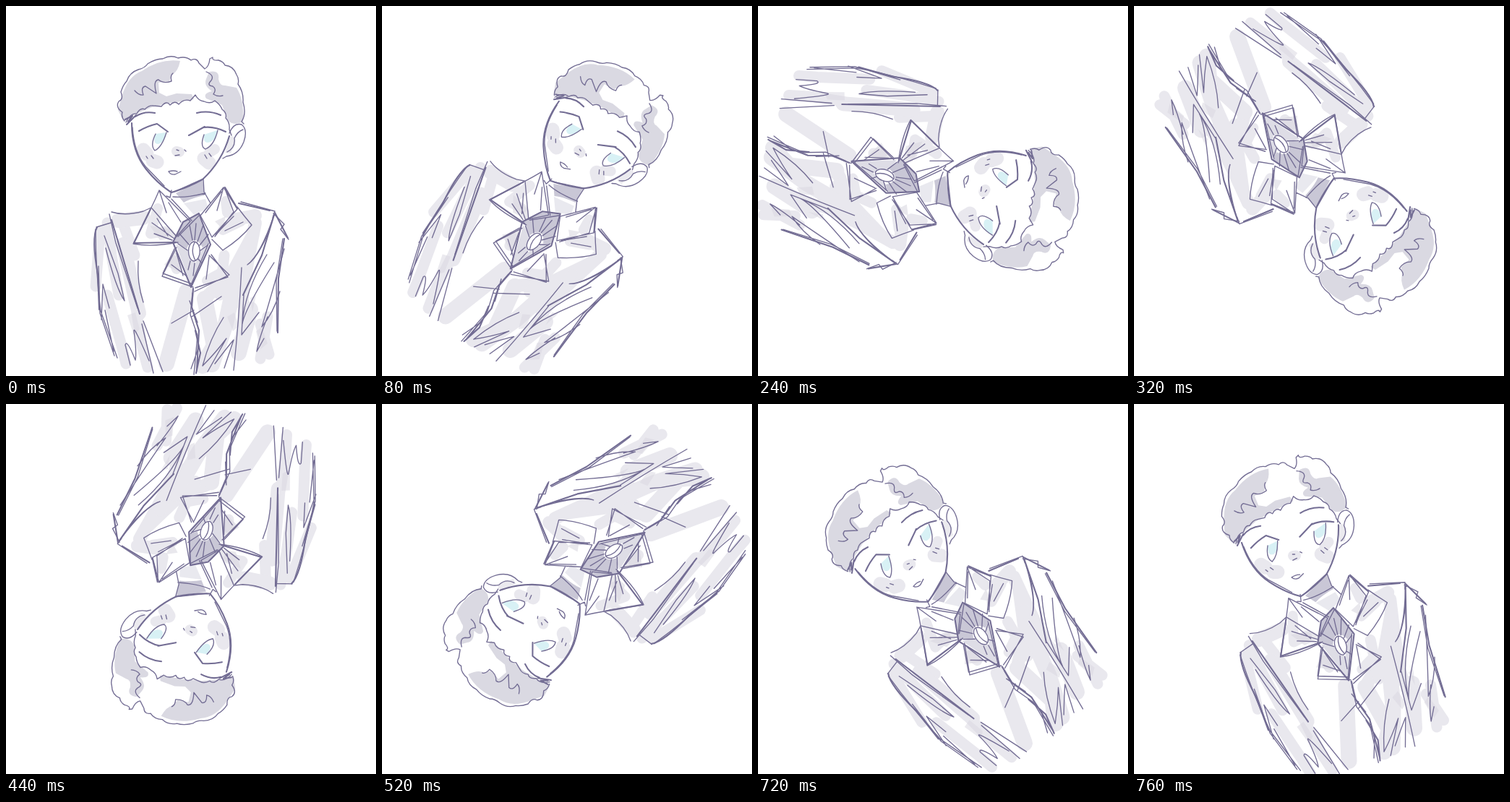
An HTML page that plays this animation: 512x512 px, repeating every 0.8 s.

```html
<!DOCTYPE html>
<html lang="en">
<head>
<meta charset="utf-8">
<title>Spinning sketch</title>
<style>
html, body { margin: 0; width: 100%; height: 100%; overflow: hidden; background: #fff; }
svg { display: block; width: 100vw; height: 100vh; }
path { fill: none; stroke-linecap: round; stroke-linejoin: round; }
.wash path { stroke: #e9e8ee; }
.tone path { fill: #dad9e2; }
.deep path { fill: #c9c7d6; }
.ink path { stroke: #736d94; stroke-width: 1.35; }
.ink .bold { stroke-width: 2.1; }
.gem { fill: #fff; }
.iris { fill: #d8f1f5; }
</style>
</head>
<body>
<svg viewBox="0 0 512 512">
<g id="figure">
  <g class="wash">
    <!-- sleeves and shoulders -->
    <path stroke-width="15" d="M130 312L124 388M140 300L146 345L156 400M160 296L178 345M140 400L160 470L166 495"/>
    <path stroke-width="20" d="M155 297L190 293M162 330L178 400L184 425"/>
    <path stroke-width="18" d="M318 295L345 290M345 300L335 350L325 410M340 320L312 372L280 400"/>
    <!-- body -->
    <path stroke-width="22" d="M250 395L236 445L222 495M275 405L288 470L272 498M318 375L304 440L285 496M338 420L322 480"/>
    <path stroke-width="15" d="M181 425L188 470L196 500M362 430L352 488M352 440L364 482M302 345L296 400M330 345L328 440"/>
    <!-- collar and bow -->
    <path stroke-width="14" d="M210 280L200 315L220 312M304 270L306 286M300 310L325 298M300 368L278 380M232 352L236 364"/>
    <!-- cheeks and nose -->
    <path stroke-width="19" d="M190 199L195 205M203 214L209 216M274 211L281 217"/>
    <path stroke-width="14" d="M236 201L240 202M281 203L289 198"/>
  </g>
  <g class="tone">
    <path d="M188 90Q214 72 241 76Q238 91 230 95L226 104L211 106L212 120L222 125L236 121L257 122L260 129L244 132L228 134L202 140L178 150L163 160L155 144L161 123Q169 97 188 90Z"/>
    <path d="M281 91Q296 88 294 101Q296 111 303 110L319 113Q330 130 328 160Q314 167 306 157L299 137L277 128Q272 121 285 118Q273 110 277 101Z"/>
    <path opacity=".55" d="M309 182Q316 176 317 187L311 204L303 203Z"/>
    <path opacity=".55" d="M168 428L179 424L185 447L177 456ZM306 430L316 424L322 443L314 450ZM346 450L354 444L362 467L352 475ZM338 404L346 400L341 424Z"/>
    <path opacity=".6" d="M199 304L230 309L238 320L213 324ZM219 358L236 337L245 371ZM289 298L304 291L300 309Z"/>
  </g>
  <g class="deep">
    <path d="M235 259L272 241L275 262Q256 266 246 272Z"/>
    <path opacity=".4" d="M246 273L276 267L280 280L260 289Z"/>
    <path d="M244 301L267 287L283 328L272 334Q260 313 250 336L232 326Z"/>
    <path opacity=".6" d="M235 330L251 336L262 356L272 334L281 331L256 387Z"/>
  </g>
  <path class="gem" d="M260 326C271 327 271 351 260 353C250 351 250 328 260 326Z"/>
  <path class="iris" d="M207 177L221 175Q219 189 211 191Q202 191 207 177ZM274 178L292 172Q293 183 283 188Q272 192 274 178Z"/>

  <g class="ink">
    <!-- hair -->
    <path d="M164 159Q159 153 161 147Q151 140 156 132Q163 129 159 119Q162 109 167 104Q171 92 183 88Q192 86 196 80Q207 73 217 73Q228 67 238 72Q249 69 256 75Q264 71 267 79L275 87Q281 84 282 73L286 71Q285 76 294 75Q301 77 303 82Q315 83 319 95Q323 101 321 108Q329 119 328 133Q333 149 326 160L329 163"/>
    <path d="M166 161Q172 148 181 149Q186 140 192 143Q198 137 204 138L215 139Q222 130 227 137Q234 130 239 136Q246 128 255 131L262 123Q266 131 274 132Q283 136 289 131Q297 137 299 143Q306 148 304 155Q310 161 309 171L312 179"/>
    <path d="M178 117Q184 124 190 123Q186 112 193 111L208 121Q203 103 211 102Q218 108 229 104Q227 96 231 93M277 91Q289 96 284 103Q277 110 286 111Q292 115 287 122Q293 126 300 124"/>
    <path class="bold" d="M167 164L180 151M165 157L175 152L169 160"/>
    <!-- face and ear -->
    <path class="bold" d="M174 162C174 190 181 210 194 226Q211 247 229 258Q250 252 272 240Q299 215 309 180"/>
    <path d="M175 168Q177 202 193 222L219 249M233 257L273 239M309 176Q315 161 326 164Q335 171 329 188Q322 206 305 208L300 211M306 202Q318 196 316 183Q320 174 328 171"/>
    <path class="bold" d="M179 153Q191 145 206 148M264 148Q281 144 297 151"/>
    <path class="bold" d="M184 173Q196 166 209 163L224 174M253 179L275 167L273 168Q288 166 304 174"/>
    <path d="M207 177Q199 193 206 200Q216 195 222 175M274 178Q268 195 276 198Q288 193 293 172"/>
    <path d="M194 208L196 211M201 207L204 211M275 206L278 211M281 204L284 208M236 199L239 200M247 199L249 201M234 207L240 206M225 229Q232 227 237 229M225 229Q228 234 234 233L242 229"/>
    <!-- neck and collar -->
    <path d="M229 255L227 265L222 263M273 239L274 257L283 273M231 264Q248 266 276 259M212 255Q207 267 201 279L236 319L255 298L212 255L222 286M229 267L257 297M225 272L242 299M301 251L269 290L285 320L320 281L301 251L292 283M303 253L315 285L289 319M276 286L298 257"/>
    <path class="bold" d="M200 281L177 328L235 327M303 251L320 280"/>
    <!-- bow -->
    <path d="M198 286L176 329Q202 334 238 327M202 300L233 322M205 315L230 324M209 294L224 318M320 278Q329 290 340 303Q325 322 300 338L285 323M315 291L290 316M303 311L328 299"/>
    <path class="bold" d="M245 299L231 327L256 389L283 330L267 287L245 299"/>
    <path d="M238 319L268 289M280 329L256 386M233 336L217 370L256 384M236 334L216 374L259 389M236 342L245 373M229 358L249 373M281 345L309 372L261 395M284 344L307 375L262 390M281 347L277 378"/>
    <path d="M260 326C271 327 271 351 260 353C250 351 250 328 260 326M261 327Q255 339 262 352M258 324L254 303M261 324L263 301M265 326L273 303M268 331L280 316M253 330L240 315M251 338L238 329M268 339L279 331M266 350L271 356M255 353L252 365M261 356L259 373"/>
    <!-- left sleeve and lapel -->
    <path class="bold" d="M146 296L185 426M126 306Q118 321 127 371L129 420"/>
    <path d="M146 285Q165 291 190 284L201 279M125 306L145 300M143 288L152 328L182 418M124 309Q124 367 131 422L154 487M128 360L130 425L150 484M136 318L155 370L164 408Q152 390 138 335M143 418L134 385L132 434M137 421L149 478M183 353Q181 383 190 410M190 436L217 506M188 440L204 508M198 491Q176 440 177 450Q181 480 179 490Q167 460 165 469L172 497"/>
    <!-- right sleeve -->
    <path class="bold" d="M322 273L365 283M372 286L390 321M385 322L377 377L376 452M371 289L354 345L328 400"/>
    <path d="M325 271L372 284L369 293M370 287L385 302L380 309L391 323M383 322L374 380L375 450M385 336Q366 405 354 444Q370 425 379 395M371 289Q352 345 334 358Q347 350 363 314M361 344Q330 395 327 440Q330 420 371 355M326 362Q322 440 315 504M329 400L326 455L350 424M362 430Q350 460 347 478L357 460"/>
    <!-- front of the coat -->
    <path class="bold" d="M259 391L257 417L267 449L264 504M262 449L269 480L263 508"/>
    <path d="M258 397L255 427L265 456L260 510M257 430L298 402L266 424M229 439L260 421M254 408L265 438M301 431Q282 460 272 498Q290 480 305 460L279 506M266 474L256 502M289 495Q308 470 315 462L302 501"/>
  </g>
</g>
</svg>
<script>
const figure = document.getElementById('figure');
const STEP_MS = 40, STEPS = 20;

function draw() {
  const step = Math.floor(performance.now() / STEP_MS) % STEPS;
  figure.setAttribute('transform', `rotate(${step * 360 / STEPS} 256 256)`);
  requestAnimationFrame(draw);
}
draw();
</script>
</body>
</html>
```
